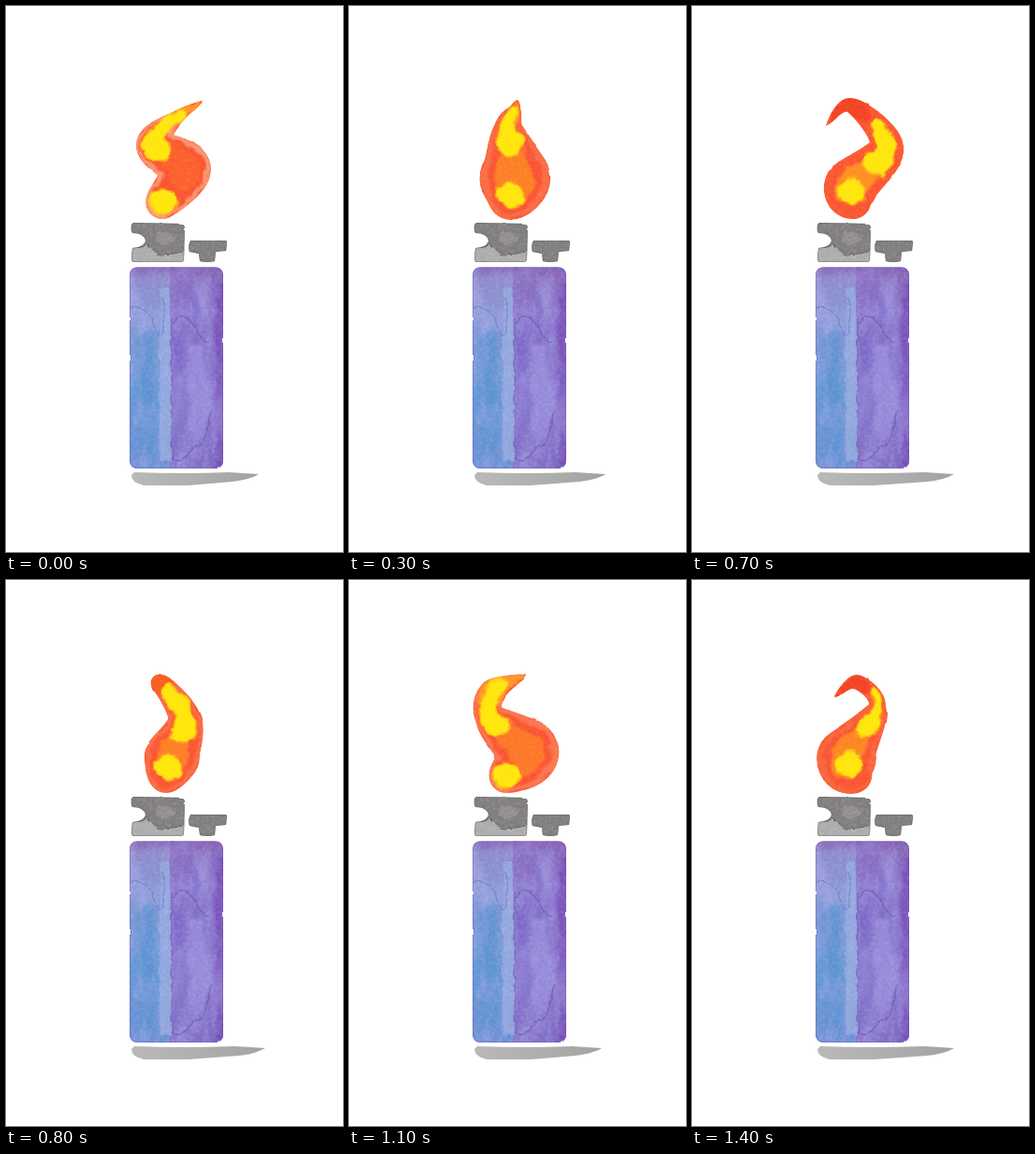
Recreate the animation shown at these times as an HTML page. Size 360x582 px, loop 1.5 s.

```html
<!DOCTYPE html>
<html lang="en">
<head>
<meta charset="utf-8">
<title>Lighter</title>
<style>
  html, body { margin: 0; width: 100%; height: 100%; overflow: hidden; background: #fff; }
  svg { display: block; width: 100%; height: 100%; }
</style>
</head>
<body>
<svg viewBox="0 0 360 582" color-interpolation-filters="sRGB">
  <defs>
    <filter id="rough" filterUnits="userSpaceOnUse" x="100" y="80" width="200" height="450">
      <feTurbulence type="fractalNoise" baseFrequency=".05" numOctaves="2" seed="4"/>
      <feDisplacementMap in="SourceGraphic" scale="2" xChannelSelector="R" yChannelSelector="G"/>
    </filter>
    <filter id="bleed" filterUnits="userSpaceOnUse" x="110" y="80" width="140" height="170">
      <feTurbulence type="fractalNoise" baseFrequency=".06" numOctaves="3" seed="9" result="n"/>
      <feGaussianBlur in="SourceGraphic" stdDeviation="1.1"/>
      <feDisplacementMap in2="n" scale="11" xChannelSelector="R" yChannelSelector="G"/>
    </filter>
    <filter id="wash" filterUnits="userSpaceOnUse" x="110" y="260" width="140" height="250">
      <feTurbulence type="fractalNoise" baseFrequency=".055 .04" numOctaves="4" seed="21" result="n"/>
      <feGaussianBlur in="SourceGraphic" stdDeviation="2.5"/>
      <feDisplacementMap in2="n" scale="16" xChannelSelector="R" yChannelSelector="G"/>
    </filter>
    <filter id="line" filterUnits="userSpaceOnUse" x="110" y="220" width="140" height="290">
      <feTurbulence type="fractalNoise" baseFrequency=".08" numOctaves="3" seed="6" result="n"/>
      <feGaussianBlur in="SourceGraphic" stdDeviation=".5"/>
      <feDisplacementMap in2="n" scale="5" xChannelSelector="R" yChannelSelector="G"/>
    </filter>
    <filter id="light" filterUnits="userSpaceOnUse" x="120" y="260" width="130" height="240">
      <feTurbulence type="fractalNoise" baseFrequency=".05 .02" numOctaves="4" seed="2"/>
      <feColorMatrix values="0 0 0 0 .68  0 0 0 0 .68  0 0 0 0 .92  2 0 0 0 -.85"/>
    </filter>
    <filter id="grain" filterUnits="userSpaceOnUse" x="120" y="80" width="170" height="440">
      <feTurbulence type="fractalNoise" baseFrequency=".3" numOctaves="2" seed="7"/>
      <feColorMatrix values="0 0 0 0 1  0 0 0 0 1  0 0 0 0 1  1.2 0 0 0 -.5"/>
    </filter>
    <linearGradient id="left" x2="0" y2="1">
      <stop stop-color="#9187c9"/><stop offset=".3" stop-color="#8498d6"/>
      <stop offset=".6" stop-color="#6598d5"/><stop offset="1" stop-color="#6a90d3"/>
    </linearGradient>
    <linearGradient id="right" x2="0" y2="1">
      <stop stop-color="#8768ba"/><stop offset=".25" stop-color="#8873cb"/>
      <stop offset=".6" stop-color="#8a7ad0"/><stop offset="1" stop-color="#7d68c3"/>
    </linearGradient>
    <linearGradient id="ground">
      <stop stop-color="#b9b9b9"/><stop offset=".6" stop-color="#adadad"/><stop offset="1" stop-color="#a2a2a2"/>
    </linearGradient>
    <clipPath id="case"><rect id="caseShape" x="132" y="278.500" width="100" height="214.500" rx="8"/></clipPath>
    <clipPath id="metal">
      <path id="metalShape" d="M136 231 189 232Q191 233 191 236L190 271Q189 273 186 273L136 273Q134 272 134 269L135 258Q148 257 149 250Q147 242 135 242Q133 240 134 233ZM197 250H235Q236 250 236 253L235 261 224 262 223 272Q215 274 207 272L206 264 196 262Q194 256 197 250Z"/>
    </clipPath>
    <clipPath id="flameClip"><path id="clip"/></clipPath>
  </defs>

  <path id="shadow" fill="url(#ground)" filter="url(#rough)"/>

  <g filter="url(#rough)">
    <g clip-path="url(#case)">
      <path fill="url(#left)" d="M130 276H180V496H130Z"/>
      <path fill="url(#right)" d="M175 276H234V496H175Z"/>
      <g filter="url(#wash)" fill="none" stroke-linecap="round">
        <path stroke="#8762b4" stroke-width="12" opacity=".7" d="M128 281H236"/>
        <path stroke="#5a91d0" stroke-width="14" opacity=".7" d="M150 350V470"/>
        <path stroke="#7645b2" stroke-width="12" opacity=".7" d="M230 300V490"/>
        <path stroke="#9a90de" stroke-width="18" opacity=".7" d="M204 365V450"/>
        <path stroke="#7661c2" stroke-width="11" opacity=".6" d="M184 335V390M205 310V350"/>
      </g>
      <path fill="#92a9dc" opacity=".85" filter="url(#line)" d="M166 300Q162 390 165 485H177Q178 390 174 300Z"/>
      <rect x="120" y="260" width="120" height="240" filter="url(#light)" opacity=".65"/>
      <g filter="url(#line)" fill="none" stroke="#6847ad" stroke-width="1.200" opacity=".6">
        <path d="M177 333V482Q190 488 198 472L211 465Q216 448 219 430"/>
        <path d="M178 340Q190 322 200 340T217 360"/>
        <path stroke="#6573c1" d="M133 322Q150 318 158 340T168 345V312"/>
      </g>
      <rect x="120" y="260" width="120" height="240" filter="url(#grain)" opacity=".25"/>
      <use href="#caseShape" fill="none" stroke="#6c51b4" stroke-width="2" opacity=".4"/>
    </g>
  </g>

  <g filter="url(#rough)">
    <g clip-path="url(#metal)">
      <path fill="#7f7d7e" d="M130 228H240V276H130Z"/>
      <path fill="#aeacab" stroke="#626164" filter="url(#line)" d="M130 256Q145 259 150 252Q155 263 166 264Q178 266 194 260V278H130Z"/>
      <path fill="#918e8d" filter="url(#line)" d="M160 241Q175 236 180 250Q170 258 160 250Z"/>
      <rect x="130" y="228" width="110" height="48" filter="url(#grain)" opacity=".3"/>
      <use href="#metalShape" fill="none" stroke="#5d5c5e" stroke-width="1.500" opacity=".5"/>
    </g>
  </g>

  <g filter="url(#rough)">
    <g clip-path="url(#flameClip)">
      <path id="body" fill="#fa5930"/>
      <g filter="url(#bleed)">
        <path id="rim" fill="#fb9470"/>
        <path id="core" fill="#fa5430"/>
        <path id="glow" fill="#ff8f20"/>
        <path id="tip"/>
        <path id="band" fill="#ffe60a"/>
        <path id="pool" fill="#ffe60a"/>
      </g>
      <rect x="120" y="85" width="120" height="150" filter="url(#grain)" opacity=".2"/>
    </g>
  </g>
</svg>
<script>
const STEP = 100, STEPS = 15;

// Each flame is a chain of discs [x, y, radius]; soft is the strength of its pale rim.
const poses = [
  { at: 0, soft: 1, chain: [[209, 102, 1], [180, 121, 8], [158, 148, 19], [191, 174, 28]] },
  { at: 2, soft: .2, chain: [[194, 96, 1], [175, 114, 7], [156, 133, 18], [179, 179, 40]] },
  { at: 5, soft: .6, chain: [[151, 112, 1], [181, 107, 6], [198, 135, 12], [174, 193, 34]] },
  { at: 7, soft: 0, chain: [[144, 126, 1], [170, 106, 8], [208, 150, 18], [170, 192, 29]] },
  { at: 10, soft: 1, chain: [[187, 102, 1], [157, 120, 14], [157, 148, 17], [192, 182, 31]] },
  { at: 12, soft: 0, chain: [[189, 102, 1], [150, 120, 15], [146, 148, 15], [187, 185, 39]] },
  { at: 14, soft: .2, chain: [[153, 124, 1], [176, 109, 8], [198, 136, 9], [165, 190, 32]] },
];
poses.push({ ...poses[0], at: STEPS });

const $ = id => document.getElementById(id);
const lerp = (a, b, t) => a + (b - a) * t;
const mix = (a, b, t) => a.map((v, i) => lerp(v, b[i], t));
const clamp = v => Math.max(0, Math.min(1, v));

function set(id, attrs) {
  for (const name in attrs) $(id).setAttribute(name, attrs[name]);
}

function disc([x, y, r]) {
  const w = 2 * r;
  return `M${x - r} ${y}a${r} ${r} 0 1 1 ${w} 0a${r} ${r} 0 1 1 ${-w} 0z`;
}

// Disc at u along the chain: centre on a smooth spline, radius linear.
function at(chain, u) {
  const i = Math.min(Math.floor(u), chain.length - 2), t = u - i;
  const b = chain[i], c = chain[i + 1];
  const a = chain[i - 1] || b, d = chain[i + 2] || c;
  const spline = k => b[k] + t / 2 * (c[k] - a[k]
    + t * (2 * a[k] - 5 * b[k] + 4 * c[k] - d[k] + t * (3 * (b[k] - c[k]) + d[k] - a[k])));
  return [spline(0), spline(1), lerp(b[2], c[2], t)];
}

// Merged discs over part of the chain, with the radius scaled.
function tube(chain, from, to, scale = 1) {
  let d = '';
  for (let u = from; u <= to; u += 1 / 40) {
    const [x, y, r] = at(chain, u);
    d += disc([x, y, r * scale]);
  }
  return d;
}

function draw(step) {
  const i = poses.findIndex(p => p.at > step) - 1;
  const a = poses[i], b = poses[i + 1];
  const t = (step - a.at) / (b.at - a.at);
  const chain = a.chain.map((node, k) => mix(node, b.chain[k], t));
  const soft = lerp(a.soft, b.soft, t);

  // The foot leans against the belly.
  const [tip, neck, , belly] = chain;
  const foot = [172 - (belly[0] - 172) / 4, 209, 18];
  chain.push(foot);

  // 1 when the tip curls back to the left, 0 when it points right.
  const hook = clamp(.5 + (neck[0] - tip[0]) / 40);

  const outline = tube(chain, 0, 4);
  for (const id of ['clip', 'body', 'rim']) set(id, { d: outline });
  set('rim', { opacity: soft });
  set('core', { d: tube(chain, 1.5, 4, .76) });
  set('glow', { d: tube(chain, 1.6, 3.2, .55), opacity: 1 - .8 * soft });
  set('tip', {
    d: tube(chain, 0, 1 + hook / 4),
    fill: `rgb(${mix([255, 150, 40], [243, 66, 36], hook)})`,
  });
  set('band', { d: tube(chain, lerp(.7, 1.6, hook), lerp(2.2, 2.4, hook), .62) });
  set('pool', { d: disc([...mix(foot, belly, .7 * hook).slice(0, 2), 14]) });

  const x = 270 + 10 * hook;
  set('shadow', { d: `M137 497Q190 499 ${x - 32} 497L${x} 499Q${x - 10} 505 ${x - 28} 507L195 511H147Q134 508 134 500Z` });
}

let last = -1;
function tick() {
  const step = Math.floor(performance.now() / STEP) % STEPS;
  if (step !== last) draw(last = step);
  requestAnimationFrame(tick);
}
tick();
</script>
</body>
</html>
```
